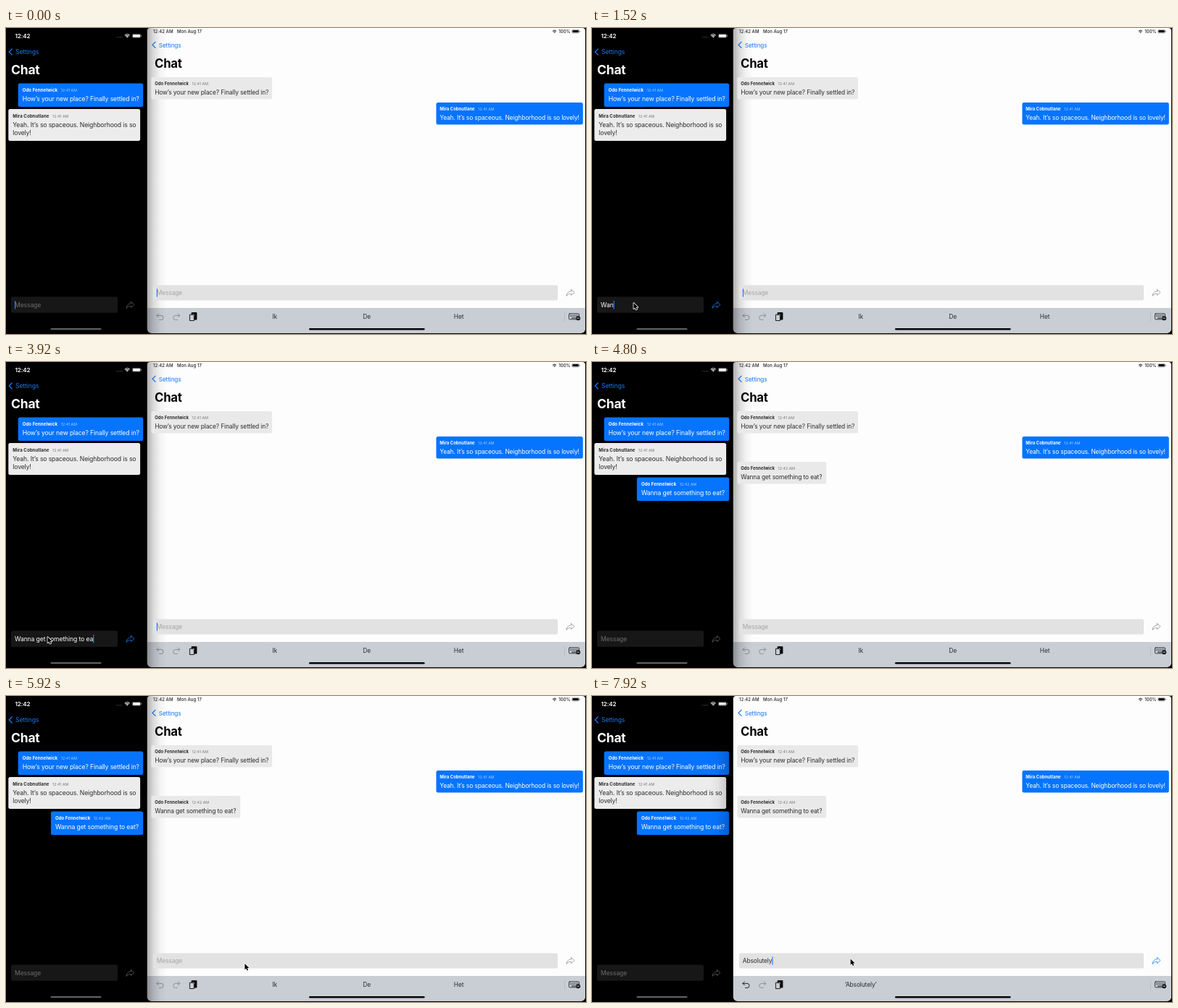
These frames come from a looping animation (800x423 px, 8000 ms). An HTML page with a canvas:

```html
<!DOCTYPE html>
<html lang="en">
<head>
<meta charset="utf-8">
<title>Chat</title>
<style>
  html, body { margin: 0; width: 100%; height: 100%; overflow: hidden; background: #000; }
  canvas { display: block; width: 800px; height: 423px; }
</style>
</head>
<body>
<canvas id="stage"></canvas>
<script>
const W = 800, H = 423, LOOP = 8000;
const BLUE = '#0674ff', LINK = '#1677f5';
const canvas = document.getElementById('stage');
const ctx = canvas.getContext('2d');
const dpr = window.devicePixelRatio || 1;
canvas.width = W * dpr;
canvas.height = H * dpr;

const ANN = 'Odo Fennelwick', BEA = 'Mira Cobnutlane';
const HELLO = 'How’s your new place? Finally settled in?';
const REPLY = 'Yeah. It’s so spaceous. Neighborhood is so lovely!';
const ASK = 'Wanna get something to eat?';
const ANSWER = 'Absolutely';

const SENT = 4520, RECEIVED = 4640, FOCUS = 6040;

// small print is tracked wider than body text
function text(str, x, y, size, color, weight = 400, align = 'left') {
  ctx.font = `${weight} ${size}px Inter, "Noto Sans", sans-serif`;
  ctx.letterSpacing = `${(size < 7 ? 0.01 : -0.013) * size}px`;
  ctx.textAlign = align;
  ctx.fillStyle = color;
  ctx.fillText(str, x, y);
  return ctx.measureText(str).width;
}

function box(x, y, w, h, r, color) {
  ctx.fillStyle = color;
  ctx.beginPath();
  ctx.roundRect(x, y, w, h, r);
  ctx.fill();
}

function stroke(d, x, y, color, width = 0.8) {
  ctx.save();
  ctx.translate(x, y);
  ctx.strokeStyle = color;
  ctx.lineWidth = width;
  ctx.lineCap = ctx.lineJoin = 'round';
  ctx.stroke(new Path2D(d));
  ctx.restore();
}

const chevron = (x, y) => stroke('M4 -4L0 0L4 4', x, y, LINK, 1.3);
const share = (x, y, color) =>
  stroke('M1 -4.5L5.5 -.5L1 3.5V1.3C-2 1.3 -4 2 -5.5 4.5C-5.2 1 -3.5 -2 1 -2.2Z', x, y, color);

function wifi(x, y, s, color) {
  ctx.strokeStyle = ctx.fillStyle = color;
  ctx.lineWidth = 1.1 * s;
  ctx.lineCap = 'butt';
  for (const r of [2.9, 4.8]) {
    ctx.beginPath();
    ctx.arc(x, y, r * s, -Math.PI * 0.76, -Math.PI * 0.24);
    ctx.stroke();
  }
  ctx.beginPath();
  ctx.moveTo(x, y);
  ctx.arc(x, y, 1.6 * s, -Math.PI * 0.76, -Math.PI * 0.24);
  ctx.fill();
}

function battery(x, y, w, h, color) {
  ctx.strokeStyle = color;
  ctx.lineWidth = 0.5;
  ctx.globalAlpha = 0.6;
  ctx.beginPath();
  ctx.roundRect(x, y, w, h, 1.5);
  ctx.stroke();
  box(x + w + 0.5, y + h / 2 - 1, 0.8, 2, 0.4, color);
  ctx.globalAlpha = 1;
  box(x + 0.7, y + 0.7, w - 1.4, h - 1.4, 1, color);
}

function bubble(x, y, w, h, fill, dark, name, time, lines, m) {
  box(x, y, w, h, 2.5, fill);
  const tx = x + m.pad, ink = dark ? '#fff' : '#2b2b2b';
  const nw = text(name, tx, y + m.name, m.nameSize, ink, 700);
  text(time, tx + nw + 4.6, y + m.name, 5.2, dark ? '#a9cfff' : '#777');
  lines.forEach((line, i) => text(line, tx, y + m.body + i * 11.6, m.size, ink));
}

function field(x, base, size, typed, caret, ink, hint) {
  let w = 0;
  if (typed) w = text(typed, x, base, size, ink);
  else text('Message', x, base, size, hint);
  if (caret) box(x + w, base - 9, 1.2, 11.6, 0.5, '#2b7bff');
}

// shadow of the active window on its neighbour, darkest at x0
function shade(x0, x1) {
  const g = ctx.createLinearGradient(x0, 0, x1, 0);
  g.addColorStop(0, 'rgba(0,0,0,.30)');
  g.addColorStop(0.3, 'rgba(0,0,0,.14)');
  g.addColorStop(0.65, 'rgba(0,0,0,.04)');
  g.addColorStop(1, 'rgba(0,0,0,0)');
  ctx.fillStyle = g;
  ctx.fillRect(Math.min(x0, x1), 0, Math.abs(x1 - x0), H);
}

const PHONE = { pad: 6, name: 11.5, body: 24.7, size: 8.6, nameSize: 6.1 };
const PAD = { pad: 4.8, name: 10.6, body: 23.5, size: 8.4, nameSize: 5.9 };

function drawPhone(t, typed) {
  text('12:42', 12.5, 13.6, 8.1, '#fff', 600);
  for (let i = 0; i < 4; i++) box(152.4 + i * 2.3, 12.3, 1, 1, 0.5, '#888');
  wifi(167.2, 13.4, 0.95, '#fff');
  battery(174.2, 8.2, 11.6, 5.2, '#fff');
  chevron(4.2, 33);
  text('Settings', 13, 36.4, 8.6, LINK);
  text('Chat', 7, 63.6, 17.5, '#fff', 700);

  bubble(16.7, 76.6, 172.5, 32.5, BLUE, true, ANN, '12:41 AM', [HELLO], PHONE);
  bubble(3.3, 112.1, 181.8, 44, '#ececec', false, BEA, '12:41 AM',
    [REPLY.slice(0, -8), REPLY.slice(-7)], PHONE);
  if (t >= SENT) bubble(61.9, 159.6, 127.3, 32.5, BLUE, true, ANN, '12:42 AM', [ASK], PHONE);

  box(7, 371.5, 147, 22.3, 2, '#171717');
  field(12, 386, 8.6, typed, t < SENT, '#fff', '#6c6c6c');
  share(171.5, 383, typed ? '#147efb' : '#606060');
  box(61.5, 415, 70, 2.3, 1.1, '#606060');
  if (t >= FOCUS) shade(194.8, 162);
}

function drawToolbar(typed) {
  box(195, 387, 604, 35, [0, 0, 6, 6], '#c9cdd4');
  const undo = 'M-2 -4.5L-4.5 -2L-2 .5M-4.5 -2H1.5A3 3 0 0 1 1.5 4H-1';
  const redo = 'M2 -4.5L4.5 -2L2 .5M4.5 -2H-1.5A3 3 0 0 0 -1.5 4H1';
  stroke(undo, 212.5, 399.4, typed ? '#111' : '#7f848b', 0.9);
  stroke(redo, 235.2, 399.4, '#858a91', 0.9);
  // clipboard
  box(255.6, 393, 7.8, 10.6, 1, '#0a0a0a');
  box(253.6, 396, 6, 8.8, 1, '#c9cdd4');
  stroke('M0 0H3.4L5.6 2.2V8.2H0Z', 253.8, 396.3, '#0a0a0a', 0.9);
  // suggestions trail the typing by one letter
  let words = ['Ik', 'De', 'Het'];
  if (typed) words = ['‘A’', 'Als', 'Alleen'];
  if (typed.length > 2) {
    const seen = typed === ANSWER ? typed : typed.slice(0, -1);
    words = [`‘${seen}’`];
  }
  words.forEach((word, i) => text(word, 370.6 + i * 127, 402.2, 8.4, '#2a2c2f', 400, 'center'));
  box(770.4, 393, 0.6, 13, 0, '#aeb2b9');
  // keyboard
  stroke('M1 0H13Q14 0 14 1V7Q14 8 13 8H1Q0 8 0 7V1Q0 0 1 0Z', 776.5, 394.8, '#15171a', 0.8);
  for (let r = 0; r < 2; r++)
    for (let i = 0; i < 6; i++) box(778 + i * 2, 396.4 + r * 1.9, 1.1, 1, 0, '#15171a');
  box(780, 400.4, 6, 1, 0, '#15171a');
  ctx.beginPath();
  ctx.arc(789.2, 401.2, 3, 0, 7);
  ctx.fill();
  box(787.6, 400.8, 3.2, 0.8, 0, '#fff');
  box(418, 415, 159.5, 2.4, 1.2, '#050505');
}

function drawPad(t, typed) {
  ctx.save();
  ctx.beginPath();
  ctx.roundRect(194.8, 0, 604.2, 421.8, [4, 4, 6, 6]);
  ctx.clip();
  ctx.fillStyle = '#fdfdfd';
  ctx.fillRect(194, 0, 606, 422);

  text('12:42 AM', 203, 6.9, 6, '#222', 500);
  text('Mon Aug 17', 236, 6.9, 6, '#222', 500);
  wifi(756.5, 7, 0.78, '#111');
  text('100%', 762.2, 6.9, 6, '#222', 500);
  battery(780.6, 2.4, 10, 4.6, '#111');
  chevron(202, 23.4);
  text('Settings', 210.8, 26.6, 8.2, LINK);
  text('Chat', 205, 54.6, 16.7, '#050505', 700);
  drawToolbar(typed);
  if (t < FOCUS) shade(195, 222);

  bubble(200.4, 68, 166.6, 30.5, '#e9e9e9', false, ANN, '12:41 AM', [HELLO], PAD);
  bubble(593.4, 103, 202.4, 30.5, BLUE, true, BEA, '12:41 AM', [REPLY], PAD);
  if (t >= RECEIVED) bubble(200.4, 138, 122.8, 30.5, '#e9e9e9', false, ANN, '12:42 AM', [ASK], PAD);

  box(203, 355.5, 558, 21, 2, '#e2e2e2');
  field(207.8, 369.2, 8.4, typed, t < SENT || t >= FOCUS, '#2b2b2b', '#a5a5a5');
  share(778.6, 366, typed ? '#147efb' : '#8f8f8f');
  ctx.restore();
}

const pointerPath = new Path2D('M0 0V8.2L1.9 6.5L3.2 9.4L4.7 8.7L3.4 6H6Z');

function drawPointer(t) {
  const glide = (start, span, x0, y0, x1, y1) => {
    const p = Math.min(1, (t - start) / span), e = p * p * (3 - 2 * p);
    return [x0 + (x1 - x0) * e, y0 + (y1 - y0) * e];
  };
  let at;
  if (t >= 640 && t < SENT) at = glide(640, 340, 110, 423, 57.4, 380);
  else if (t >= 5600) at = glide(5600, 440, 205, 400, 356.6, 363.5);
  if (!at) return;
  ctx.save();
  ctx.translate(...at);
  ctx.lineJoin = 'round';
  ctx.strokeStyle = '#fff';
  ctx.lineWidth = 1.6;
  ctx.stroke(pointerPath);
  ctx.fillStyle = '#000';
  ctx.fill(pointerPath);
  ctx.restore();
}

const typing = (str, t, start, step) => str.slice(0, Math.max(0, Math.floor((t - start) / step)));

function draw(t) {
  ctx.setTransform(dpr, 0, 0, dpr, 0, 0);
  ctx.fillStyle = '#000';
  ctx.fillRect(0, 0, W, H);
  drawPhone(t, t < SENT ? typing(ASK, t, 1138, 109) : '');
  drawPad(t, typing(ANSWER, t, 6360, 130));
  drawPointer(t);
}

const begin = performance.now();
function frame() {
  draw((performance.now() - begin) % LOOP);
  requestAnimationFrame(frame);
}
frame();
</script>
</body>
</html>
```
